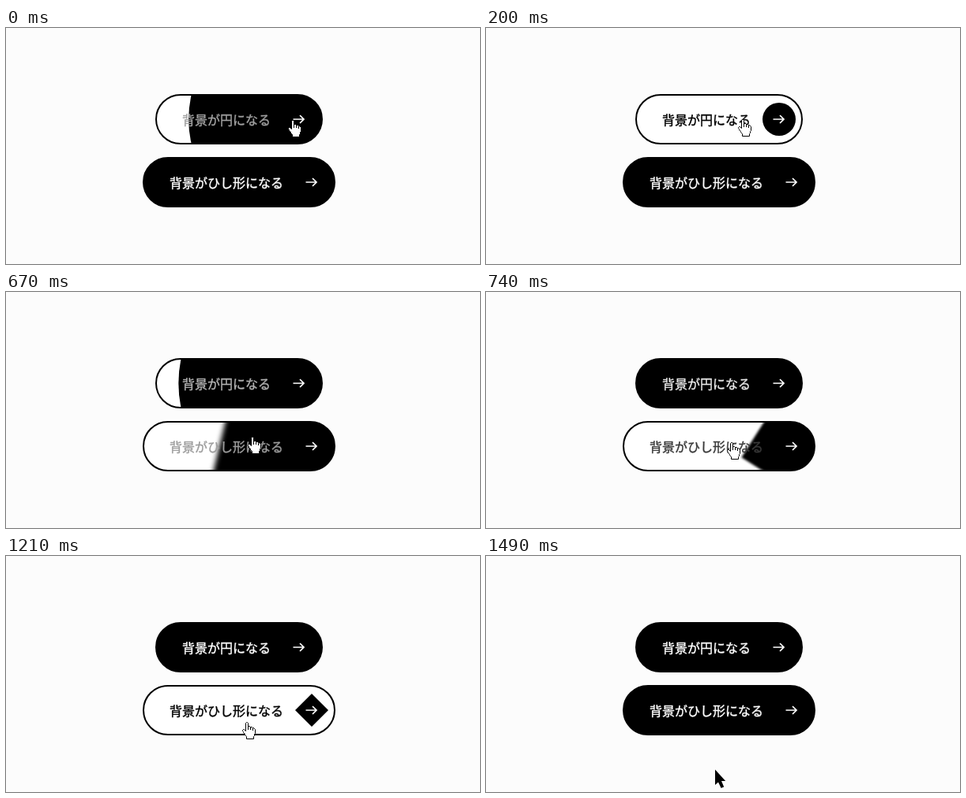
Recreate the animation shown at these times as an HTML page. Size 600 by 300 pixels, loop 1.55 s.

```html
<!DOCTYPE html>
<html lang="ja">
<head>
<meta charset="utf-8">
<title>Hover buttons</title>
<style>
  html, body { margin: 0; width: 100%; height: 100%; overflow: hidden; background: #fcfcfc; }
  svg { display: block; width: 600px; height: 300px; }
  text {
    font: 500 16px "Noto Sans CJK JP", "Noto Sans CJK", sans-serif;
    fill: currentColor; stroke: currentColor; stroke-width: .4;
  }
  .border { fill: none; stroke: #000; stroke-width: 2; }
  .icon { fill: none; stroke: #fff; stroke-width: 1.7; }
</style>
</head>
<body>
<svg viewBox="0 0 600 300">
  <defs>
    <rect id="roundPill" x="190" y="85" width="210" height="62" rx="31"/>
    <rect id="diamondPill" x="174" y="165" width="242" height="62" rx="31"/>
    <clipPath id="roundClip"><use href="#roundPill"/></clipPath>
    <clipPath id="diamondClip"><use href="#diamondPill"/></clipPath>
    <filter id="soften" filterUnits="userSpaceOnUse" x="0" y="0" width="600" height="300" color-interpolation-filters="sRGB">
      <feGaussianBlur id="blur" stdDeviation="0"/>
    </filter>
    <path id="arrowIcon" class="icon" d="M-7.5 0H5.5M1 -5L6 0L1 5"/>
  </defs>

  <g clip-path="url(#roundClip)">
    <use id="roundBack" href="#roundPill"/>
    <circle id="disc" cx="371" cy="116"/>
  </g>
  <use class="border" href="#roundPill"/>
  <text id="roundLabel" x="223" y="123">背景が円になる</text>
  <use href="#arrowIcon" x="371" y="116"/>

  <g clip-path="url(#diamondClip)">
    <use id="diamondBack" href="#diamondPill"/>
    <polygon id="diamond"/>
  </g>
  <use class="border" href="#diamondPill"/>
  <text id="diamondLabel" x="207" y="203">背景がひし形になる</text>
  <use href="#arrowIcon" x="387" y="196"/>

  <g id="hand" fill="#fff" stroke="#000" stroke-linejoin="round">
    <path d="M5.5 .5H6.5L7.5 1.5V5.5H9.5L10.5 6.5H12.5L13.5 7.5H14.5L16.5 9.5V14.5L15.5 15.5V17.5L14.5 18.5V21.5H5.5V18.5L3.5 16.5V15.5L1.5 13.5V12.5L.5 11.5V10.5L1.5 9.5H2.5L4.5 11.5V1.5Z"/>
    <path fill="none" d="M7.5 5V10M10.5 6.5V10M13.5 7.5V11"/>
  </g>
  <path id="pointer" d="M0 -.5V19L4 15.5L7.6 23L11.2 21.4L8 14H13.2Z"/>
</svg>
<script>
  const LOOP = 1550, DURATION = 300, SIZE = 21, GROWTH = 9;
  const $ = id => document.getElementById(id);

  // [time, cursor x, cursor y]; the picture holds between these moments
  const steps = [
    [0, 357, 117], [70, 341, 116], [140, 326, 116], [200, 319, 116],
    [530, 311, 138], [600, 309, 164], [670, 306, 184], [740, 305, 191], [810, 304, 193], [880, 304, 194],
    [1210, 299, 211], [1280, 292, 252], [1350, 290, 272], [1420, 290, 272], [1490, 290, 272]
  ];

  // CSS "ease": cubic-bezier(.25, .1, .25, 1)
  function ease(x) {
    if (x <= 0) return 0;
    if (x >= 1) return 1;
    const bezier = (a, b, u) => 3 * a * u * (1 - u) ** 2 + 3 * b * u * u * (1 - u) + u ** 3;
    let low = 0, high = 1;
    for (let i = 0; i < 24; i++) {
      const mid = (low + high) / 2;
      if (bezier(.25, .25, mid) < x) low = mid; else high = mid;
    }
    return bezier(.1, 1, low);
  }

  function hover(time, enter, leave) {
    const run = start => ease((time - start) / DURATION);
    const amount = run(enter) - run(leave);
    return amount < .03 ? 0 : amount > .99 ? 1 : amount;
  }

  const scaleAt = amount => 1 + GROWTH * (1 - amount);

  function paintButton(name, amount) {
    const shade = Math.round(255 * (1 - amount));
    $(name + "Label").style.color = `rgb(${shade},${shade},${shade})`;
    $(name + "Back").setAttribute("fill", amount ? "#fff" : "#000");
  }

  function paintDiamond(amount) {
    const scale = scaleAt(amount), h = SIZE * scale, k = h * (1 - amount);
    const corners = [[-k, -h], [h, -k], [k, h], [-h, k]];
    $("diamond").setAttribute("points", corners.map(([x, y]) => `${387 + x},${196 + y}`).join(" "));
    $("blur").setAttribute("stdDeviation", scale / 2);
    $("diamond").setAttribute("filter", amount < 1 ? "url(#soften)" : "none");
  }

  function draw(now) {
    const elapsed = now % LOOP;
    const [time, x, y] = steps.filter(step => step[0] <= elapsed).pop();
    const round = hover(time, -70, 547), diamond = hover(time, 598, 1250);

    paintButton("round", round);
    paintButton("diamond", diamond);
    $("disc").setAttribute("r", SIZE * scaleAt(round));
    paintDiamond(diamond);

    const outside = time >= 1280;
    $("hand").style.display = outside ? "none" : "";
    $("pointer").style.display = outside ? "" : "none";
    $(outside ? "pointer" : "hand").setAttribute("transform", `translate(${x} ${y})`);
  }

  const start = performance.now();
  function tick() {
    draw(performance.now() - start);
    requestAnimationFrame(tick);
  }
  tick();
</script>
</body>
</html>
```
